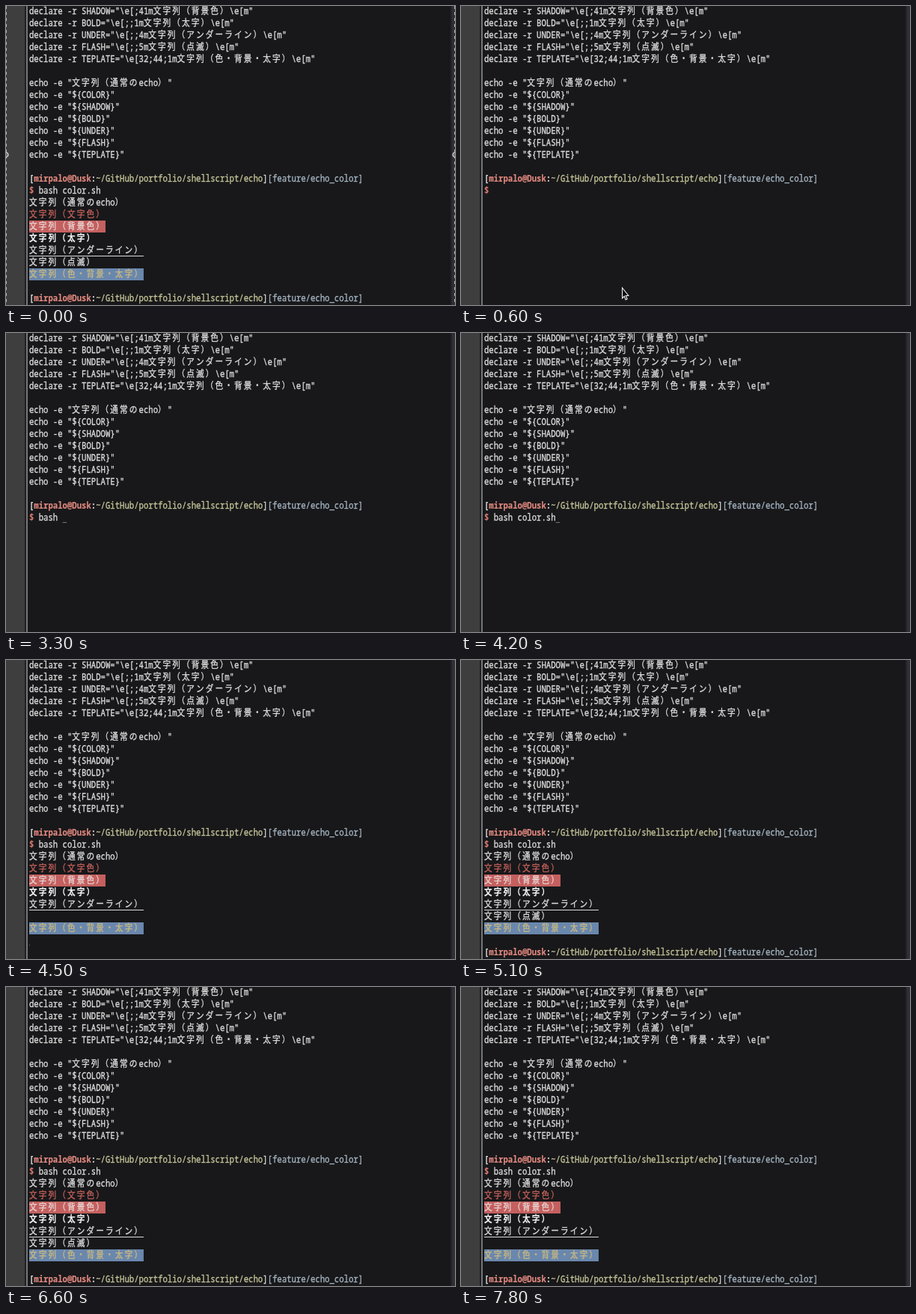
These frames come from a looping animation (600 px wide and 400 px high, 8 s). An HTML page with a canvas:

```html
<!DOCTYPE html>
<html lang="ja">
<head>
<meta charset="utf-8">
<title>Terminal echo colours</title>
<style>
html, body { margin: 0; width: 100%; height: 100%; overflow: hidden; background: #18181a; }
canvas { display: block; width: 600px; height: 400px; }
</style>
</head>
<body>
<canvas id="stage" width="600" height="400"></canvas>
<script>
const ctx = document.getElementById('stage').getContext('2d');

const LOOP = 8000, STEP = 300;
const LEFT = 31, ROW = 16, CELL = 7.2, SQUEEZE = 0.885;
const LATIN = '12px "Noto Sans Mono", "DejaVu Sans Mono", monospace';
const WIDE = '12px "Noto Sans CJK JP", "Noto Sans CJK", sans-serif';
const C = {
  bg: '#18181a', text: '#dcdcdc', bold: '#f2f2f2', user: '#e0887f', path: '#c6c69a',
  branch: '#a5b5c2', dollar: '#d9796f', red: '#c4605a', redBg: '#c4605f',
  blueBg: '#6a87ad', gold: '#bdb385', dim: '#777777'
};

const isWide = ch => ch.charCodeAt(0) >= 0x2e80;
const cells = text => [...text].reduce((n, ch) => n + (isWide(ch) ? 2 : 1), 0);
const centre = row => 7 + ROW * row;

function rect(x, y, w, h, color) {
  ctx.fillStyle = color;
  ctx.fillRect(x, y, w, h);
}

// Terminal text on a fixed grid, slightly emboldened; returns the next free column.
function print(row, text, color = C.text, bold = false, col = 0) {
  const weight = bold ? '700 ' : '500 ';
  ctx.save();
  ctx.translate(LEFT, centre(row) + 4);
  ctx.scale(SQUEEZE, 1);
  ctx.fillStyle = ctx.strokeStyle = color;
  ctx.lineWidth = bold ? 0.15 : 0.35;
  ctx.lineJoin = 'round';
  for (const ch of text) {
    const wide = isWide(ch);
    ctx.font = weight + (wide ? WIDE : LATIN);
    ctx.fillText(ch, col * CELL, 0);
    ctx.strokeText(ch, col * CELL, 0);
    col += wide ? 2 : 1;
  }
  ctx.restore();
  return col;
}

function band(row, text, color, y = -8, h = ROW) {
  rect(LEFT, centre(row) + y, cells(text) * CELL * SQUEEZE, h, color);
}

function caret(row, col) {
  rect(LEFT + col * CELL * SQUEEZE, centre(row) + 6, 5.5, 1, C.dim);
}

function prompt(row) {
  const parts = [
    ['[', C.text, true], ['mirpalo@Dusk', C.user, true], [':', C.text, true],
    ['~/GitHub/portfolio/shellscript/echo', C.path], [']', C.text],
    ['[feature/echo_color]', C.branch]
  ];
  let col = 0;
  for (const [text, color, bold] of parts) col = print(row, text, color, bold, col);
}

const script = [
  ['SHADOW', ';41m文字列（背景色）'],
  ['BOLD', ';;1m文字列（太字）'],
  ['UNDER', ';;4m文字列（アンダーライン）'],
  ['FLASH', ';;5m文字列（点滅）'],
  ['TEPLATE', '32;44;1m文字列（色・背景・太字）']
].map(([name, value]) => `declare -r ${name}="\\e[${value}\\e[m"`);
script.push('', 'echo -e "文字列（通常のecho）"');
for (const name of ['COLOR', 'SHADOW', 'BOLD', 'UNDER', 'FLASH', 'TEPLATE'])
  script.push('echo -e "${' + name + '}"');

function output(flashOn) {
  const shadow = '文字列（背景色）', under = '文字列（アンダーライン）', mix = '文字列（色・背景・太字）';
  print(16, '文字列（通常のecho）');
  print(17, '文字列（文字色）', C.red);
  band(18, shadow, C.redBg);
  print(18, shadow, '#e6d6d4');
  print(19, '文字列（太字）', C.bold, true);
  print(20, under);
  band(20, under, C.text, 7, 1);
  if (flashOn) print(21, '文字列（点滅）');
  band(22, mix, C.blueBg);
  print(22, mix, C.gold, true);
}

function desktop() {
  rect(0, 0, 600, 400, C.bg);
  rect(0, 0, 25, 400, '#3e3e3f');
  rect(25, 0, 2, 400, '#202022');
  rect(27, 0, 2, 400, '#73767d');
  rect(594, 0, 2, 400, '#222430');
  rect(596, 0, 4, 400, '#303032');
}

function selection() {
  ctx.strokeStyle = '#b5b5b5';
  ctx.lineWidth = 1;
  ctx.setLineDash([4, 4]);
  for (const x of [0.5, 599.5]) {
    ctx.beginPath();
    ctx.moveTo(x, 0);
    ctx.lineTo(x, 400);
    ctx.stroke();
  }
  ctx.setLineDash([]);
  for (const x of [0, 600]) {
    ctx.beginPath();
    ctx.arc(x, 199, 3.2, 0, Math.PI * 2);
    ctx.fillStyle = '#777777';
    ctx.fill();
    ctx.strokeStyle = '#e4e4e4';
    ctx.stroke();
  }
}

function pointer(x, y) {
  const pts = [[0, 0], [0, 14], [2.7, 11.3], [4.6, 16], [6.6, 15], [4.7, 10.5], [8.3, 10.4]];
  ctx.beginPath();
  for (const [dx, dy] of pts) ctx.lineTo(x + dx, y + dy);
  ctx.closePath();
  ctx.fillStyle = '#080808';
  ctx.fill();
  ctx.strokeStyle = '#f0f0f0';
  ctx.lineWidth = 1.1;
  ctx.stroke();
}

function draw(time) {
  const tick = Math.floor(time / STEP);
  const opening = tick === 0, ran = opening || tick >= 15;
  const command = 'bash color.sh';
  const typed = ran ? 13 : [0, 1, 3, 5, 7, 10, 13][Math.max(0, tick - 8)];

  desktop();
  script.forEach((line, row) => print(row, line));
  prompt(14);
  print(15, '$', C.dollar, true);
  print(15, command.slice(0, typed), C.text, false, 2);

  if (ran) {
    output(opening || tick % 5 === 2 || tick % 5 === 3);
    if (tick === 15) rect(LEFT, 381, 1, 1, C.dim);
    else prompt(24);
  } else {
    if (tick >= 8) caret(15, 2 + typed);
    else pointer(215.5, 377);
  }
  if (opening) selection();
}

function loop() {
  draw(performance.now() % LOOP);
  requestAnimationFrame(loop);
}
loop();
</script>
</body>
</html>
```
